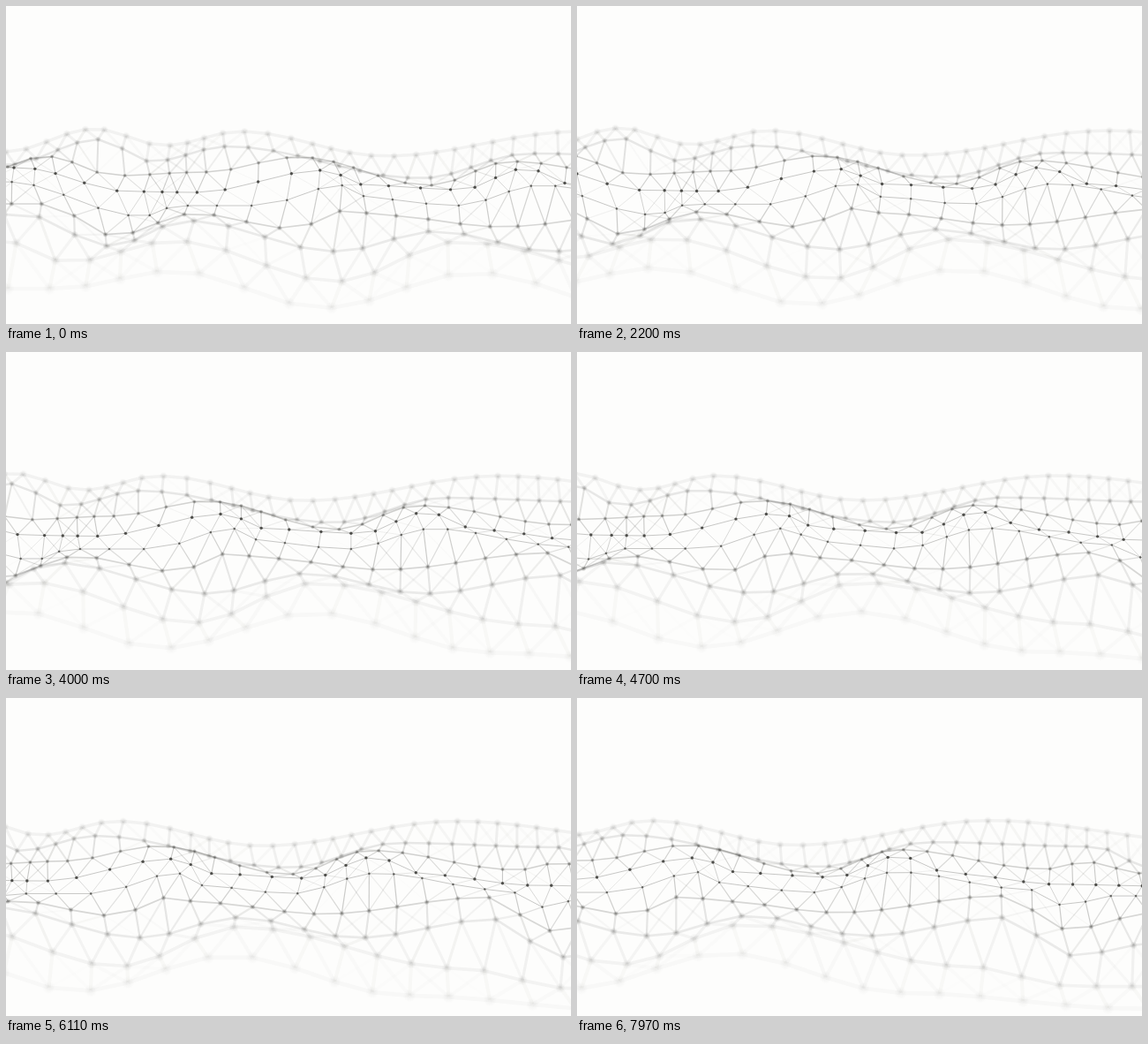
Recreate the animation shown at these times as an HTML page with a canvas. Size 640x360 px, loop 8 s.

```html
<!DOCTYPE html>
<html lang="en">
<head>
<meta charset="utf-8">
<title>Mesh wave</title>
<style>
html, body { margin: 0; width: 100%; height: 100%; overflow: hidden; background: #fdfdfc; }
canvas { display: block; width: 100vw; height: 100vh; }
</style>
</head>
<body>
<canvas id="stage" width="640" height="360"></canvas>
<script>
const ctx = document.getElementById('stage').getContext('2d');
const LOOP = 8000;
const FPS = 30;
const FOCUS = 3.4;

// Sideways pull along the wave, in grid steps from the middle of the stage.
const SWAY = [[-11, 0], [-9, -0.3], [-6.3, 0.22], [-3, -0.58], [1, 0.28], [3, -0.05],
  [6.3, 0.52], [10, 0.08], [14.5, 0.6], [20, 0.35]];

// Rows from back to front; crests lists the tops and bottoms of the wave.
const rows = [
  { start: 0, sway: 0.5, crests: [[0, 165], [100, 139], [180, 158], [265, 142], [430, 170],
    [650, 142], [900, 166]] },
  { start: 10, sway: 0.5, crests: [[0, 180], [105, 151], [165, 176], [250, 159], [470, 195],
    [593, 167], [780, 172], [850, 198]] },
  { start: 28, sway: 0.7, crests: [[-20, 186], [45, 170], [125, 192], [225, 188], [332, 171],
    [480, 203], [572, 176], [740, 198], [785, 190], [850, 203]] },
  { start: 9, sway: 1.1, crests: [[15, 183], [140, 210], [215, 211], [360, 186], [410, 203],
    [515, 208], [588, 184], [650, 204], [770, 216], [890, 218]] },
  { start: 10, sway: 1, crests: [[0, 199], [155, 238], [195, 226], [285, 226], [380, 203],
    [415, 218], [510, 226], [605, 203], [750, 222], [800, 242], [840, 230]] },
  { start: 10, sway: 0.4, crests: [[45, 224], [122, 260], [213, 235], [325, 252], [388, 231],
    [425, 237], [560, 250], [747, 231], [821, 269], [920, 250]] },
  { start: 2, sway: 0.4, crests: [[20, 236], [118, 272], [205, 243], [375, 278], [486, 255],
    [620, 278], [775, 257], [850, 300], [960, 284]] },
  { start: 12, sway: 0.4, crests: [[-10, 264], [70, 290], [190, 266], [375, 312], [510, 267],
    [760, 314], [889, 337]] },
  { start: 0, sway: 0.4, crests: [[60, 320], [190, 300], [360, 342], [530, 302], [730, 347],
    [1000, 365]] }
];

// Equal steps in depth give the spacing; distance from the focus gives the blur.
rows.forEach((row, depth) => {
  const blur = Math.max(0, Math.abs(depth - FOCUS) - 0.6);
  row.pitch = 1 / (0.0436 - 0.0027 * depth);
  row.blur = blur;
  row.radius = row.pitch * 0.06 + blur * 1.15;
  row.dotAlpha = 0.85 * Math.exp(-0.75 * blur);
  row.line = { width: 0.7 + blur, alpha: 0.4 * Math.exp(-0.72 * blur) };
});

const ink = alpha => `rgba(58,58,54,${alpha.toFixed(3)})`;

function curve(keys, x) {
  let i = 1;
  while (i < keys.length - 1 && keys[i][0] < x) i++;
  const [x0, y0] = keys[i - 1], [x1, y1] = keys[i];
  const u = Math.min(1, Math.max(0, (x - x0) / (x1 - x0)));
  return y0 + (y1 - y0) * (1 - Math.cos(u * Math.PI)) / 2;
}

// The grid stands still while the wave slides left by one step a second.
function place({ start, sway, crests, pitch }, t) {
  const nodes = [];
  for (let base = start - 3 * pitch; base < 640 + 3 * pitch; base += pitch) {
    const x = base + curve(SWAY, (base - 320) / pitch + t) * sway * pitch;
    const y = curve(crests, x + pitch * t) - pitch * pitch * 0.0008 * t;
    nodes.push([x, y]);
  }
  return nodes;
}

function link(p, q, { width, alpha }, fade = 1) {
  ctx.strokeStyle = ink(alpha * fade);
  ctx.lineWidth = width;
  ctx.beginPath();
  ctx.moveTo(p[0], p[1]);
  ctx.lineTo(q[0], q[1]);
  ctx.stroke();
}

function drawDot([x, y], { radius, dotAlpha, blur }) {
  ctx.fillStyle = ink(dotAlpha);
  if (blur) {
    const glow = ctx.createRadialGradient(x, y, 0, x, y, radius);
    glow.addColorStop(0, ink(dotAlpha));
    glow.addColorStop(0.45, ink(dotAlpha * 0.7));
    glow.addColorStop(1, ink(0));
    ctx.fillStyle = glow;
  }
  ctx.beginPath();
  ctx.arc(x, y, radius, 0, Math.PI * 2);
  ctx.fill();
}

function joinRows(back, front, backNodes, frontNodes) {
  const line = {
    width: (back.line.width + front.line.width) / 2,
    alpha: (back.line.alpha + front.line.alpha) / 2
  };
  const reach = front.pitch * 1.15;
  for (const p of backNodes) {
    for (const q of frontNodes) {
      const gap = Math.abs(p[0] - q[0]) / reach;
      if (gap < 1) link(p, q, line, 0.85 * (1 - gap * gap));
    }
  }
}

function draw(t) {
  ctx.fillStyle = '#fdfdfc';
  ctx.fillRect(0, 0, 640, 360);
  const placed = rows.map(row => place(row, t));
  rows.forEach((row, r) => {
    const nodes = placed[r];
    for (let i = 1; i < nodes.length; i++) link(nodes[i - 1], nodes[i], row.line);
    if (r) joinRows(rows[r - 1], row, placed[r - 1], nodes);
  });
  rows.forEach((row, r) => placed[r].forEach(node => drawDot(node, row)));
}

function tick() {
  const ms = performance.now() % LOOP;
  draw(Math.floor(ms * FPS / 1000) / FPS);
  requestAnimationFrame(tick);
}
tick();
</script>
</body>
</html>
```
